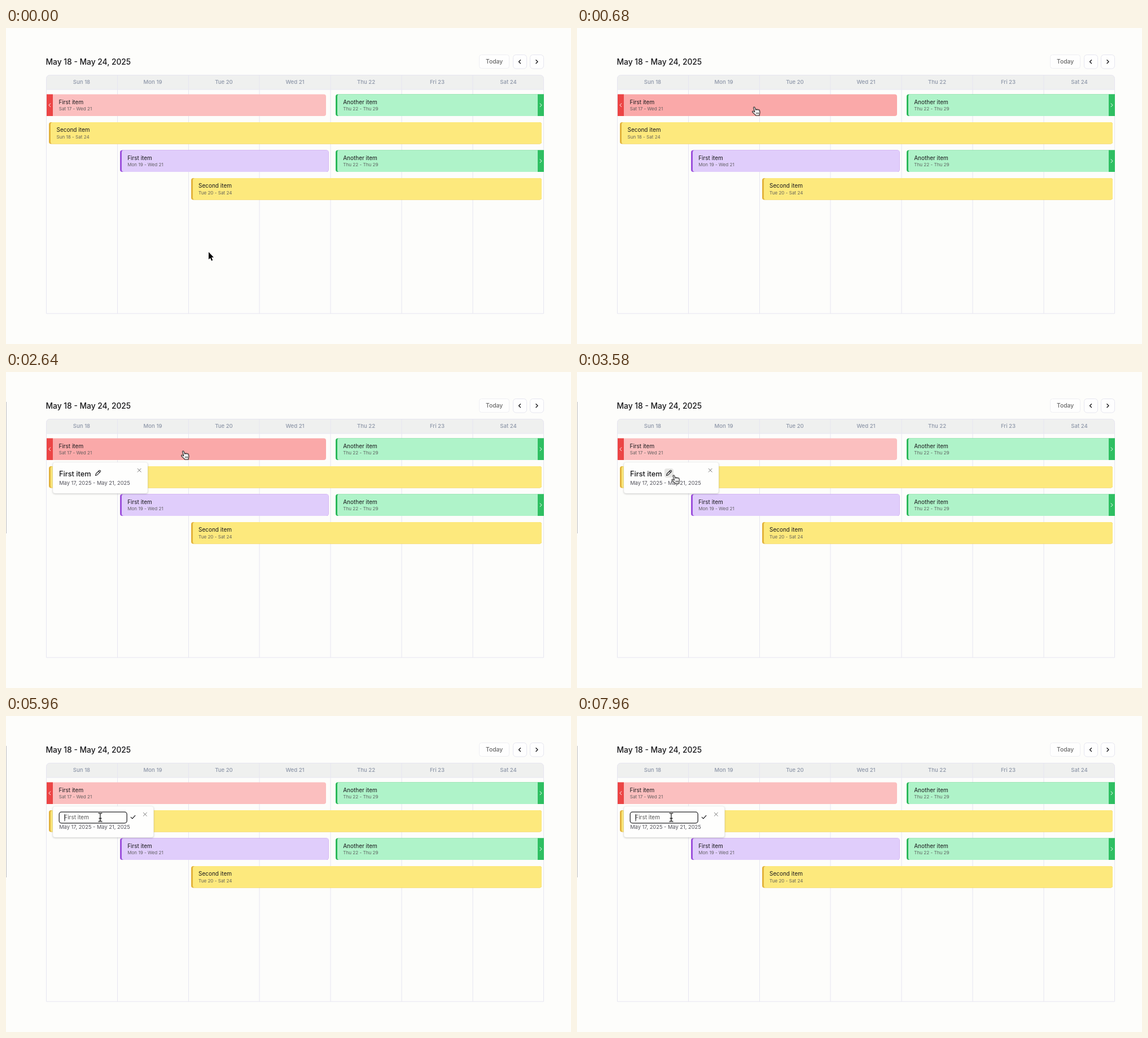
An HTML page that plays this animation: 1001 by 560 pixels, repeating every 8 s.

```html
<!DOCTYPE html>
<html lang="en">
<head>
<meta charset="utf-8">
<title>Week calendar</title>
<style>
  html, body { margin: 0; width: 100%; height: 100%; overflow: hidden; background: #fdfdfb; }
  svg { display: block; }
  text { font-family: Inter, "Open Sans", sans-serif; fill: #18181b; }
  .title { font-size: 13.8px; font-weight: 500; }
  .days text { font-size: 9.6px; font-weight: 500; fill: #8d96a8; text-anchor: middle; }
  .name { font-size: 10px; }
  .range { font-size: 8.1px; fill: #555; fill-opacity: .9; }
  .today { font-size: 10.3px; font-weight: 500; fill: #666; }
  .heading { font-size: 12.8px; font-weight: 500; }
  .span { font-size: 9.3px; fill: #52525b; }
  .line { fill: none; stroke-linecap: round; stroke-linejoin: round; }
  .grid { fill: none; stroke: #e6e5f0; }
  .button { fill: #fefefe; stroke: #e6e6f0; }
  .chip { fill: #e6e6e4; }
  .card { fill: #fefefd; stroke: #e8e8e8; stroke-width: .5; filter: drop-shadow(0 1px 1.5px #0003); }
  .red { fill: #fbbfbf; }
  .purple { fill: #e0cdfb; }
  .green { fill: #aff3c9; }
  .yellow { fill: #fde97d; }

  /* One shared 8 s clock: 1% = 80 ms */
  .red { animation: red-hover 8s linear infinite; }
  .purple { animation: purple-hover 8s linear infinite; }
  .cursor { animation: travel 8s linear infinite; }
  .arrow { animation: arrow 8s step-end infinite; }
  .hand { animation: hand 8s step-end infinite; }
  .beam, .edit { animation: editing 8s step-end infinite; }
  .view { animation: viewing 8s step-end infinite; }
  .popup { animation: popup 8s linear infinite; }
  .pen-chip { animation: pen-chip 8s linear infinite; }
  .check-chip { animation: check-chip 8s linear infinite; }
  .caret { animation: caret 1s step-end .6s infinite; }
  .edge { animation: edge 8s step-end infinite; }
  .ring { transform-box: fill-box; transform-origin: center; animation: ring-open 8s linear infinite; }
  .ring.second { animation-name: ring-edit; }

  @keyframes travel {
    0% { transform: translate(359px, 397px); animation-timing-function: cubic-bezier(.4, 0, .7, .8); }
    4.5% { transform: translate(327px, 184px); animation-timing-function: cubic-bezier(.2, .5, .4, 1); }
    8.75%, 33% { transform: translate(310px, 136.5px); animation-timing-function: ease-in-out; }
    40%, 100% { transform: translate(167.5px, 179.5px); }
  }
  @keyframes hand {
    0%, 3.125%, 4.0625%, 5.5%, 36.25%, 57.5%, 100% { opacity: 0; }
    2.25%, 3.3125%, 4.25%, 6.25%, 39% { opacity: 1; }
  }
  @keyframes arrow {
    0%, 3.125%, 4.0625%, 5.5%, 36.25% { opacity: 1; }
    2.25%, 3.3125%, 4.25%, 6.25%, 39%, 100% { opacity: 0; }
  }
  @keyframes editing { 0% { opacity: 0; } 57.5%, 100% { opacity: 1; } }
  @keyframes viewing { 0% { opacity: 1; } 57.5%, 100% { opacity: 0; } }
  @keyframes edge { 0% { opacity: 0; } 33%, 100% { opacity: 1; } }
  @keyframes caret { 0% { opacity: 1; } 50%, 100% { opacity: 0; } }
  @keyframes popup { 0%, 18.75% { opacity: 0; } 20%, 100% { opacity: 1; } }
  @keyframes pen-chip { 0%, 39% { opacity: 0; } 40.5%, 100% { opacity: 1; } }
  @keyframes check-chip { 0%, 66% { opacity: 1; } 68%, 100% { opacity: 0; } }
  @keyframes red-hover {
    0%, 6.25%, 38.1%, 100% { fill: #fbbfbf; }
    8.1%, 36.25% { fill: #faa9a9; }
  }
  @keyframes purple-hover {
    0%, 3.3%, 6%, 100% { fill: #e0cdfb; }
    4.06% { fill: #d9c1f8; }
  }
  @keyframes ring-open {
    0%, 15.4% { opacity: 0; transform: scale(.75); }
    15.5% { opacity: 1; transform: scale(.75); }
    16.5%, 17.6% { opacity: 1; transform: none; }
    18.6%, 100% { opacity: 0; transform: none; }
  }
  @keyframes ring-edit {
    0%, 55.9% { opacity: 0; transform: scale(.75); }
    56% { opacity: 1; transform: scale(.75); }
    57%, 58.1% { opacity: 1; transform: none; }
    59.1%, 100% { opacity: 0; transform: none; }
  }
</style>
</head>
<body>
<svg width="1001" height="560" viewBox="0 0 1001 560">
  <path class="edge" d="M.5 53V286" stroke="#bdbdc0"/>

  <text class="title" x="70.5" y="64.6">May 18 - May 24, 2025</text>
  <rect class="button" x="838.5" y="47.5" width="53" height="24" rx="4" style="stroke:#efeff3"/>
  <text class="today" x="850" y="63.2">Today</text>
  <rect class="button" x="898.5" y="47.5" width="24" height="24.5" rx="5"/>
  <rect class="button" x="928.5" y="47.5" width="24" height="24.5" rx="5"/>
  <path class="line" d="M911.5 56.7l-3 3 3 3M939 56.7l3 3-3 3" stroke="#18181b" stroke-width="1.4"/>

  <path d="M71.5 109V89.5a6 6 0 0 1 6-6H946.5a6 6 0 0 1 6 6V109Z" fill="#eff0ef"/>
  <path class="grid" d="M71.5 506V89.5a6 6 0 0 1 6-6H946.5a6 6 0 0 1 6 6V506ZM71.5 109H952.5"/>
  <path class="grid" d="M197.5 84V506M323.5 84V506M449 84V506M575 84V506M701 84V506M827 84V506"/>
  <g class="days">
    <text x="134" y="99.4">Sun 18</text>
    <text x="260" y="99.4">Mon 19</text>
    <text x="386" y="99.4">Tue 20</text>
    <text x="512" y="99.4">Wed 21</text>
    <text x="638" y="99.4">Thu 22</text>
    <text x="764" y="99.4">Fri 23</text>
    <text x="890" y="99.4">Sat 24</text>
  </g>

  <g transform="translate(72 117.5)">
    <path class="red" d="M0 0H491a4 4 0 0 1 4 4V34.5a4 4 0 0 1-4 4H0Z"/>
    <path d="M0 0H11V38.5H0Z" fill="#ec4545"/>
    <path class="line" d="M6.7 16.3l-2.7 2.9 2.7 2.9" stroke="#fff"/>
    <text class="name" x="21.5" y="17">First item</text>
    <text class="range" x="21.7" y="28.8">Sat 17 - Wed 21</text>
  </g>

  <defs>
    <g id="another">
      <path d="M369 0H4a4 4 0 0 0-4 4V34.5a4 4 0 0 0 4 4H369Z" fill="#2bb85a"/>
      <path class="green" d="M358 0H6a3 4 0 0 0-3 4V34.5a3 4 0 0 0 3 4H358Z"/>
      <path d="M358 0H369V38.5H358Z" fill="#2fbf62"/>
      <path class="line" d="M362.2 16.3l2.7 2.9-2.7 2.9" stroke="#fff"/>
      <text class="name" x="13.2" y="17">Another item</text>
      <text class="range" x="13.2" y="28.8">Thu 22 - Thu 29</text>
    </g>
    <path id="beam" d="M-3.500-7.5Q-.5-7.5-.5-5.5V5.5Q-.5 7.5-3.5 7.5M2.5-7.5Q-.5-7.5-.5-5.5V5.5Q-.5 7.5 2.5 7.5M-2.5 2H1.5"/>
  </defs>
  <use href="#another" x="584" y="117.5"/>
  <use href="#another" x="584" y="216.5"/>

  <g transform="translate(76 167)">
    <rect width="873" height="38.5" rx="4" fill="#e2b33c"/>
    <rect class="yellow" x="3" width="870" height="38.5" rx="4"/>
    <text class="name" x="13.5" y="17">Second item</text>
    <text class="range" x="13.5" y="28.8">Sun 18 - Sat 24</text>
  </g>
  <g transform="translate(202 216.5)">
    <rect width="369.5" height="38.5" rx="4" fill="#9b4fdc"/>
    <rect class="purple" x="3" width="366.5" height="38.5" rx="4"/>
    <text class="name" x="13.2" y="17">First item</text>
    <text class="range" x="13.2" y="28.8">Mon 19 - Wed 21</text>
  </g>
  <g transform="translate(328 266)">
    <rect width="621" height="38.5" rx="4" fill="#e2b33c"/>
    <rect class="yellow" x="3" width="618" height="38.5" rx="4"/>
    <text class="name" x="13" y="17">Second item</text>
    <text class="range" x="13" y="28.8">Tue 20 - Sat 24</text>
  </g>

  <g class="popup">
    <g class="view">
      <rect class="card" x="83" y="160" width="168" height="55" rx="4"/>
      <text class="heading" x="94" y="184.5">First item</text>
      <rect class="chip pen-chip" x="155" y="171" width="16" height="16" rx="4"/>
      <path class="line" d="M158.5 183.5l.7-3 6-6q1.2-.7 2 .2t.1 1.9l-6 6ZM164 175.7l2.1 2.1" stroke="#27272a" stroke-width="1.1"/>
      <path class="line" d="M233.2 171.2l6 6m0-6l-6 6" stroke="#777"/>
    </g>
    <g class="edit">
      <rect class="card" x="83" y="160" width="178.5" height="55" rx="4"/>
      <rect x="94.2" y="170.2" width="120" height="19.6" rx="4" fill="#fefefd" stroke="#27272a" stroke-width="1.3"/>
      <text class="name" x="103.3" y="183.4" style="fill:#555">First item</text>
      <path class="caret" d="M104 174V186.5" stroke="#18181b"/>
      <rect class="chip check-chip" x="217" y="171" width="16" height="16" rx="4"/>
      <path class="line" d="M221.3 179.3l2.5 2.6 5-5.6" stroke="#18181b" stroke-width="1.2"/>
      <path class="line" d="M243.4 171.2l6 6m0-6l-6 6" stroke="#777"/>
    </g>
    <text class="span" x="94.2" y="199.7">May 17, 2025 - May 21, 2025</text>
  </g>

  <g fill="none" stroke="#18181b" stroke-width="1.2">
    <circle class="ring" cx="310" cy="136" r="31"/>
    <circle class="ring second" cx="167.5" cy="179.5" r="31"/>
  </g>

  <g class="cursor">
    <path class="arrow" d="M0 0V13L3 10.4 5 15.5 7.2 14.6 5.1 9.6H9Z" fill="#000" stroke="#fff" stroke-width="1.2" paint-order="stroke"/>
    <g class="hand" fill="#fff" stroke="#111" stroke-width="1.1" stroke-linejoin="round">
      <path d="M4.8 11.4L2.7 5.4C2.2 3.6 4.3 2.7 5 4.4L6.8 8.7C7 7.4 8.8 7.3 9.2 8.5 9.5 7.5 11 7.5 11.4 8.8 12.1 8 13.3 8.5 13.5 9.8 14 12 14.4 14 13.3 16L13.1 18.5H6.9C5.6 16.6 3.5 15.3 1 12.7 0 11.3 1.6 10 2.8 10.9L4.8 12.3Z"/>
      <path d="M7.8 13v3M9.7 13v3M11.5 13v3" stroke-width=".8"/>
    </g>
    <g class="beam line">
      <use href="#beam" stroke="#fff" stroke-width="2.4"/>
      <use href="#beam" stroke="#111" stroke-width="1.3"/>
    </g>
  </g>
</svg>
</body>
</html>
```
